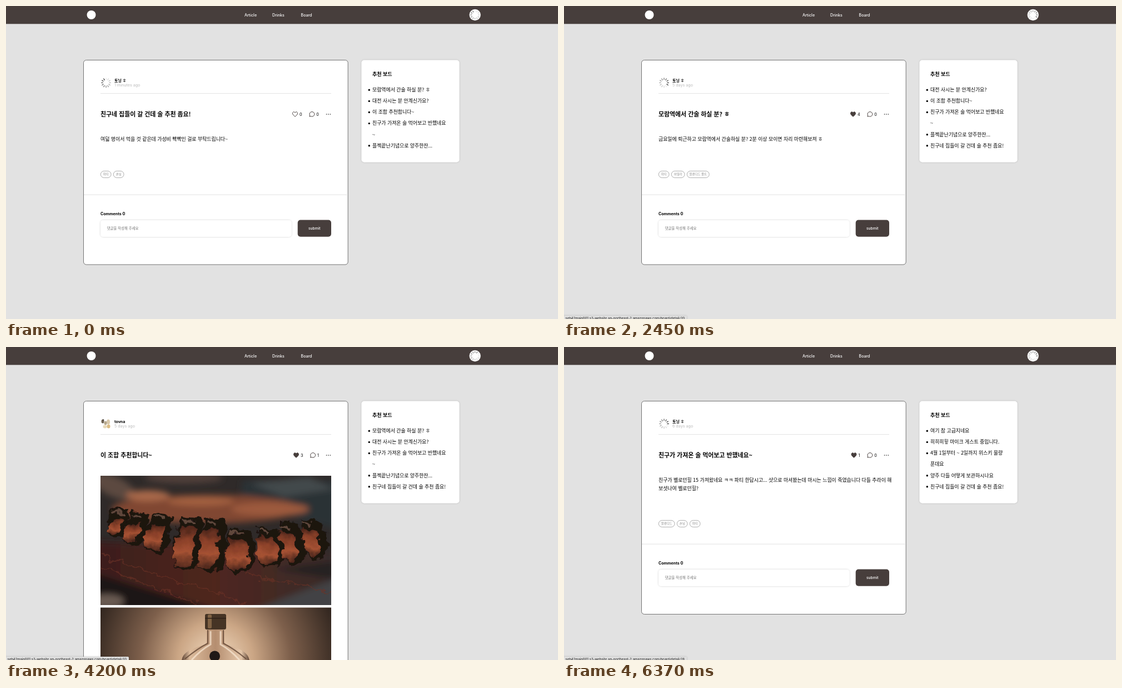
Animation, 993 px wide and 564 px high, one loop 6.44 s. Source, as an HTML page:

```html
<!DOCTYPE html>
<html lang="ko">
<head>
<meta charset="utf-8">
<title>Board</title>
<style>
html, body { margin: 0; width: 100%; height: 100%; overflow: hidden; background: #e2e2e2; }
svg { display: block; width: 993px; height: 564px; }
text { font: 500 9px "Noto Sans CJK KR", "Noto Sans CJK", "Noto Sans", sans-serif; }
.latin { font-family: Inter, "Noto Sans CJK KR", sans-serif; font-size: 7.1px; }
.bold { font-weight: 700; }
.title { font-size: 10.9px; font-weight: 700; }
.mid { text-anchor: middle; }
</style>
</head>
<body>
<svg viewBox="0 0 993 564">
  <defs>
    <filter id="shadow" x="-10%" y="-30%" width="120%" height="160%">
      <feDropShadow dx="0" dy="0" stdDeviation="1.8" flood-opacity=".2"/>
    </filter>
    <filter id="blur"><feGaussianBlur stdDeviation="6"/></filter>
    <filter id="rough">
      <feTurbulence type="fractalNoise" baseFrequency=".06" numOctaves="3" seed="4"/>
      <feDisplacementMap in="SourceGraphic" scale="20" xChannelSelector="R" yChannelSelector="G"/>
      <feGaussianBlur stdDeviation=".6"/>
    </filter>
    <clipPath id="meatClip"><rect x="170" y="232" width="415" height="233"/></clipPath>
    <linearGradient id="meat" x2="0" y2="1">
      <stop offset="0" stop-color="#4a241a"/><stop offset=".35" stop-color="#8a4029"/>
      <stop offset=".65" stop-color="#a65233"/><stop offset="1" stop-color="#4a251c"/>
    </linearGradient>
    <linearGradient id="board">
      <stop offset="0" stop-color="#3a1d19"/><stop offset=".5" stop-color="#4f271f"/>
      <stop offset="1" stop-color="#372b2a"/>
    </linearGradient>
    <radialGradient id="glow" gradientUnits="userSpaceOnUse" cx="377" cy="562" r="225">
      <stop offset="0" stop-color="#f3dcc2"/><stop offset=".3" stop-color="#cba685"/>
      <stop offset=".6" stop-color="#7d5f4b"/><stop offset="1" stop-color="#32261f"/>
    </radialGradient>
    <linearGradient id="glass">
      <stop offset="0" stop-color="#5f4434"/><stop offset=".12" stop-color="#dcbb9c"/>
      <stop offset=".5" stop-color="#b58e70"/><stop offset=".88" stop-color="#e4c6a9"/>
      <stop offset="1" stop-color="#5f4434"/>
    </linearGradient>
  </defs>
  <g id="scene"></g>
</svg>
<script>
const LOOP = 6440, SPIN = 1003, BROWN = '#473e3c';
const HOST = 'seb42main001.s3-website.ap-northeast-2.amazonaws.com/board/detail/';

const STATION = '모람역에서 간술 하실 분? ㅎ', CITY = '대전 사시는 분 안계신가요?', COMBO = '이 조합 추천합니다~';
const GIFT = ['친구가 가져온 술 먹어보고 반했네요', '+~'];
const PROJECT = '플젝끝난기념으로 양주한잔...', PARTY = '친구네 집들이 갈 건데 술 추천 좀요!';

const party = {
  author: '토닝 ㅎ', ago: '1 minutes ago', title: PARTY, likes: 0, replies: 0, iconX: [515, 545],
  body: ['여덟 명이서 먹을 것 같은데 가성비 빡빡인 걸로 부탁드립니다~'],
  tags: ['파티', '손님'], list: [STATION, CITY, COMBO, ...GIFT, PROJECT], bottom: 466,
};
const station = {
  author: '토닝 ㅎ', ago: '5 days ago', title: STATION, likes: 4, replies: 0, iconX: [515, 545],
  body: ['금요일에 퇴근하고 모람역에서 간술하실 분? 2분 이상 모이면 자리 마련해보져 ㅎ'],
  tags: ['파티', '아일라', '블랜디드 몰트'], list: [CITY, COMBO, ...GIFT, PROJECT, PARTY], bottom: 466,
};
const combo = {
  author: 'tovna', ago: '5 days ago', title: COMBO, likes: 3, replies: 1, iconX: [517, 546.7],
  body: [], tags: ['파티', '폭포'], list: [STATION, CITY, ...GIFT, PROJECT, PARTY], bottom: 554.5,
};
const comboLoaded = { ...combo, loaded: true, bottom: 700 };
const gift = {
  author: '토닝 ㅎ', ago: '6 days ago', title: '친구가 가져온 술 먹어보고 반했네요~', likes: 1, replies: 0, iconX: [516.5, 545],
  body: ['친구가 벨로던힐 15 가져왔네요 ㅋㅋ 파티 한답시고... 샷으로 마셔봤는데 마시는 느낌이 죽였습니다 다들 추라이 해',
    '보셧나여 벨로던힐?'],
  tags: ['블랜디드', '손님', '파티'], bottom: 481.5, shift: 15,
  list: ['여기 참 고급지네요', '히히히힣 마이크 게스트 중입니다.', '4월 1일부터 ~ 2일까지 위스키 물량', '+푼데요', '양주 다들 어떻게 보관하시나요', PARTY],
};

const PAGES = [[0, party], [2310, station], [4130, combo], [4200, comboLoaded], [6020, gift]];
const LINKS = [[0, 20], [1610, 27], [2450, 20], [4060, 33], [4970, 4], [6090, 28]];
const at = (track, t) => track.filter(([start]) => start <= t).pop()[1];

const text = (x, y, s, cls = '', fill = '#000', size = '') =>
  `<text x="${x}" y="${y}" class="${cls}" fill="${fill}"${size && ` style="font-size:${size}px"`}>${s}</text>`;
const rect = (x, y, w, h, fill, r = 0, extra = '') =>
  `<rect x="${x}" y="${y}" width="${w}" height="${h}" rx="${r}" fill="${fill}" ${extra}/>`;
const circle = (x, y, r, fill) => `<circle cx="${x}" cy="${y}" r="${r}" fill="${fill}"/>`;
const path = (d, fill, extra = '') => `<path d="${d}" fill="${fill}" ${extra}/>`;
const ellipse = (x, y, rx, ry, fill, turn = 0) =>
  `<ellipse cx="${x}" cy="${y}" rx="${rx}" ry="${ry}" fill="${fill}" transform="rotate(${turn} ${x} ${y})"/>`;
const dots = (x, y) => [-3.4, 0, 3.4].map(d => circle(x + d, y, .85, '#333')).join('');
const SHADOW = 'filter="url(#shadow)"';

function spinner(x, y, inner, outer, width, head) {
  let out = '';
  for (let i = 0; i < 12; i++) {
    const age = (head - i + 24) % 12;
    out += `<path d="M${x} ${y - inner}V${y - outer}" stroke="#333" stroke-width="${width}" stroke-linecap="round"
      opacity="${1 - age * .08}" transform="rotate(${i * 30} ${x} ${y})"/>`;
  }
  return out;
}

function header(head) {
  return rect(0, 0, 993, 32.3, BROWN) + circle(153.5, 16, 8, '#fff') +
    text(440, 18.8, 'Article', 'latin mid', '#fff') + text(490, 18.8, 'Drinks', 'latin mid', '#fff') +
    text(540.5, 18.8, 'Board', 'latin mid', '#fff') +
    circle(843.7, 16, 10.2, '#fff') + spinner(843.7, 16, 5.8, 8, .9, head);
}

function icons({ iconX: [hx, bx], likes, replies }) {
  const line = `stroke="${BROWN}" stroke-width="1"`;
  return path(`M${hx + 5} 199.3C${hx + 3} 197.4 ${hx + .5} 195.8 ${hx + .5} 193.4C${hx + .5} 190.3 ${hx + 4} 190 ${hx + 5} 192.3
      C${hx + 6} 190 ${hx + 9.5} 190.3 ${hx + 9.5} 193.4C${hx + 9.5} 195.8 ${hx + 7} 197.4 ${hx + 5} 199.3Z`, likes ? BROWN : 'none', line) +
    path(`M${bx + 1} 199.2L${bx + 1.5} 196.8A4.4 4.3 0 1 1 ${bx + 3.4} 198.7Z`, 'none', line) +
    text(hx + 13, 197.7, likes, 'latin', '#222') + text(bx + 13.3, 197.7, replies, 'latin', '#222') + dots(580, 195);
}

function tags(names, y) {
  let x = 170.3;
  return names.map(name => {
    const spaces = name.split(' ').length - 1, w = 8.7 + (name.length - spaces) * 5 + spaces * 1.2;
    const out = rect(x, y, w, 12, '#fff', 6, 'stroke="#999" stroke-width=".8"') +
      text(x + w / 2, y + 8, name, 'mid', '#888', 5.4);
    x += w + 4.3;
    return out;
  }).join('');
}

// A cut slice: dark crust behind, lit face in front, both leaning by `lean`.
function slice([x, top, w, h, lean]) {
  const shape = (cx, y, half, tall) => `M${cx - lean - half * .6} ${y}L${cx - lean + half * .7} ${y + 3}
    C${cx + half} ${y + tall * .3} ${cx + half * 1.3} ${y + tall} ${cx} ${y + tall}
    C${cx - half * 1.4} ${y + tall} ${cx - half} ${y + tall * .4} ${cx - lean - half * .6} ${y}Z`;
  return path(shape(x + 6, top - 12, w / 2 + 5, h + 14), '#1d1211') + path(shape(x, top + 6, w / 2 - 2, h - 10), 'url(#meat)') +
    path(`M${x - lean - w * .2} ${top - 6}l${w * .5} 4`, 'none', 'stroke="#8a6a58" stroke-width="4" opacity=".6"');
}

function meatPhoto() {
  const slices = [[193, 302, 30, 42, -8], [224, 310, 32, 46, -10], [264, 312, 40, 58, -10], [318, 318, 42, 82, -10],
    [363, 320, 42, 84, -6], [416, 338, 46, 68, 2], [474, 334, 42, 62, 14], [514, 326, 34, 64, 14], [553, 320, 34, 62, 14]];
  return `<g clip-path="url(#meatClip)">` + rect(170, 232, 415, 233, '#2f2a29') +
    `<g filter="url(#blur)">` +
    ellipse(195, 252, 40, 18, '#5b4a41', 25) + ellipse(320, 236, 70, 10, '#51413a') +
    path('M425 240H600V330L420 280Z', '#2c3135') + path('M440 246L545 234L590 256L500 270Z', '#43484b') +
    path('M150 350L600 370V480H150Z', 'url(#board)') + path('M150 405L400 480H150Z', '#1c1717') +
    path('M430 480L600 415V480Z', '#434245') + path('M480 400L600 385V420Z', '#252022') + ellipse(182, 458, 30, 12, '#6b5c53') +
    ellipse(360, 292, 170, 26, '#804630') + ellipse(255, 268, 40, 10, '#a7684a') + ellipse(350, 278, 60, 8, '#a3603f') +
    ellipse(475, 292, 70, 12, '#9c5a3e') + '</g>' +
    `<g filter="url(#rough)">` + path('M170 375L430 462M170 395L345 462M430 410L585 440', 'none', 'stroke="#6e3527" stroke-width="2" opacity=".6"') +
    slices.map(slice).join('') + '</g></g>';
}

function bottlePhoto() {
  return rect(170, 469.5, 415, 100, 'url(#glow)') +
    path('M361 508H393V532C394 541 436 540 438 566H316C318 540 360 541 361 532Z', 'url(#glass)') +
    path('M363 510V534Q345 543 322 562M391 510V534Q409 543 432 562', 'none', 'stroke="#54392a" stroke-width="2" opacity=".7"') +
    path('M368 512V536Q350 546 334 564M386 512V536Q404 546 420 564', 'none', 'stroke="#fae8d4" stroke-width="3" opacity=".7"') +
    rect(358, 481, 38, 28, '#463425', 3) + rect(363, 482, 7, 25, '#806244', 2) +
    rect(358, 488, 38, 1.5, '#2d2017') + circle(375.5, 557, 9.5, '#211916');
}

function portrait() {
  return ellipse(174, 134, 2.5, 3.5, '#6f6353') + ellipse(184, 135, 3, 4.5, '#d9c8aa') + ellipse(179, 137, 2.5, 3.5, '#b5a78c') +
    ellipse(178, 143.5, 3.5, 3, '#e9dabb') + ellipse(184.5, 143, 3, 3.5, '#dcbd85') + circle(175, 131.5, 1.3, '#4c443e');
}

function comments({ shift = 0, replies }) {
  const reply = replies ? rect(170, 436, 415, 77.5, '#fff', 6, SHADOW) + circle(197, 463, 12.3, '#e2e2e2') +
    text(216, 460.7, 'yolu', 'latin bold') + text(216, 471.5, '5 days ago', 'latin', '#c4c4c4') +
    dots(564.7, 456) + text(189, 495.5, '이건 못 참죠 뭘 좀 아시네요', '', '#000', 8) : '';
  return `<g transform="translate(0 ${shift})">` + rect(140, 339.6, 475, 1, '#e2e2e2') +
    text(170, 377.4, 'Comments ' + replies, 'latin bold') + rect(170, 386, 343.5, 30, '#fff', 5, SHADOW) +
    text(181.5, 403.3, '댓글을 작성해 주세요', '', '#757575', 6.45) +
    rect(524.7, 385.6, 60.3, 30.2, BROWN, 5) + text(554.8, 403.2, 'submit', 'latin mid', '#fff', 6.7) + reply + '</g>';
}

function post(page, head) {
  const { author, ago, title, body, bottom, loaded, shift = 0 } = page;
  return rect(139.5, 97.5, 475.7, bottom - 97.5, '#fff', 5, 'stroke="#555" stroke-width=".8"') +
    (loaded ? portrait() : spinner(180, 138.3, 5.7, 8.4, 1.3, head)) +
    text(195, 136.6, author, /[a-z]/.test(author) ? 'latin bold' : 'bold', '#000', 7) +
    text(195, 145.3, ago, 'latin', '#c4c4c4') + rect(170, 157, 415, .8, '#ddd') +
    text(170, 198.8, title, 'title') + icons(page) +
    body.map((line, i) => text(170, 242.6 + i * 15, line, '', '#000', 8.9)).join('') +
    (loaded ? meatPhoto() + bottlePhoto() : tags(page.tags, 297.4 + shift) + comments(page));
}

function sidebar(lines) {
  return rect(639.5, 97.6, 176, 183.8, '#fff', 5, SHADOW) + text(659, 126.2, '추천 보드', 'bold') +
    lines.map((line, i) => {
      const y = 151 + i * 20.1, wrapped = line[0] === '+';
      return (wrapped ? '' : circle(653.3, y + .3, 1.7, '#000')) + text(659, y + 3.1, wrapped ? line.slice(1) : line, '', '#000', 8.88);
    }).join('');
}

function statusBar(id, opacity) {
  return `<g opacity="${opacity}">` + rect(-5, 558, id > 9 ? 226 : 222, 12, '#dedede', 2, SHADOW) +
    text(2.5, 564.8, HOST + id, 'latin', '#333', 5.9) + '</g>';
}

const scene = document.getElementById('scene');
let lastKey = '';
function frame(now) {
  const t = now % LOOP;
  const page = at(PAGES, t), link = at(LINKS, t);
  const head = Math.round(11 + 12 * t / SPIN) % 12;
  const fade = Math.max(0, Math.min(1, (t - 1260) / 140)).toFixed(2);
  const key = [PAGES.findIndex(p => p[1] === page), link, head, fade].join();
  if (key !== lastKey) {
    scene.innerHTML = rect(0, 0, 993, 564, '#e2e2e2') + header(head) + post(page, head) + sidebar(page.list) + statusBar(link, fade);
    lastKey = key;
  }
  requestAnimationFrame(frame);
}
frame(performance.now());
</script>
</body>
</html>
```
